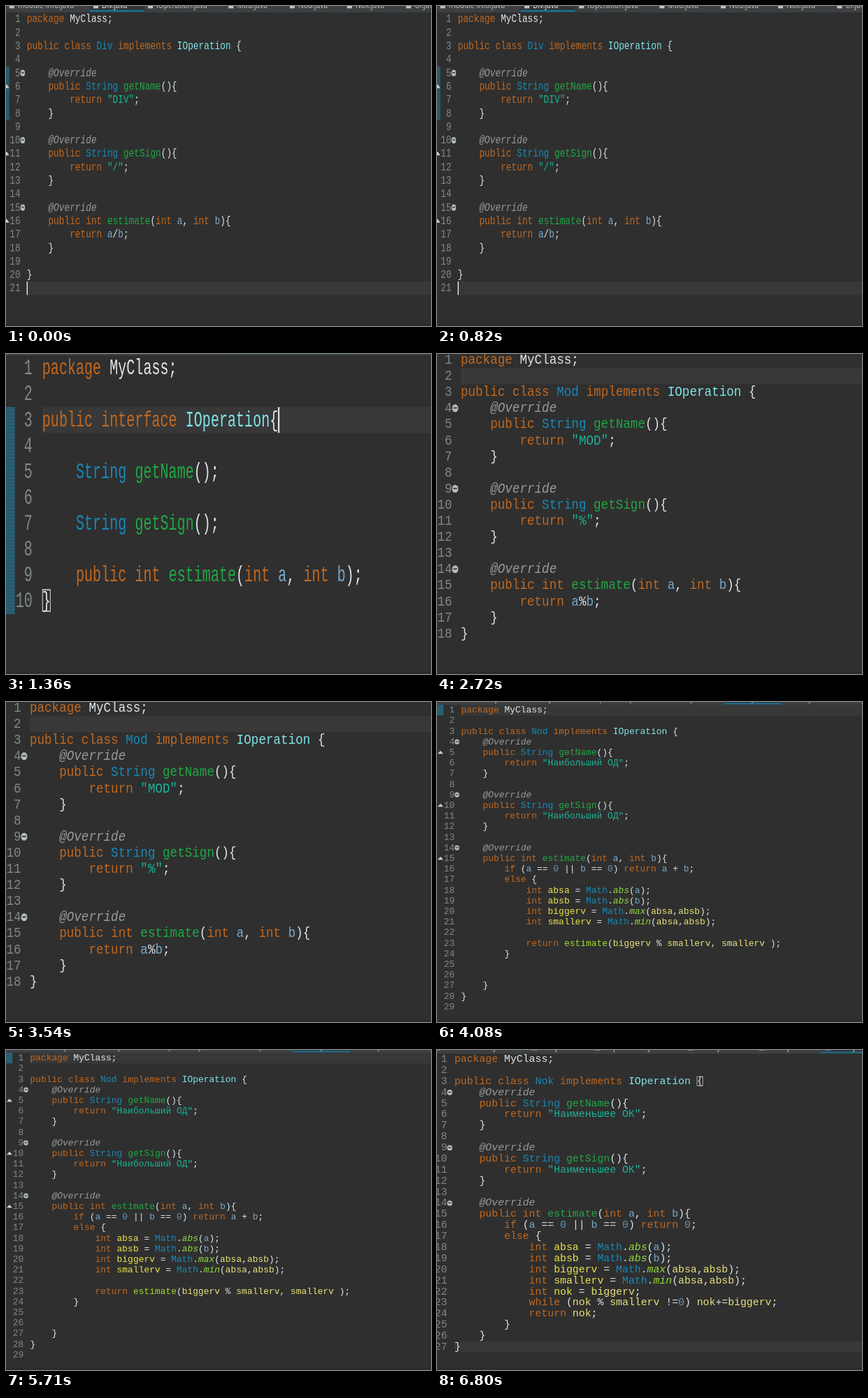
An HTML page for the animation above (8 s loop, 608 by 459 pixels).

```html
<!DOCTYPE html>
<html lang="en">
<head>
<meta charset="utf-8">
<title>Java operations</title>
<style>
html, body { margin: 0; width: 100%; height: 100%; overflow: hidden; background: #2f2f2f; }
#stage { position: relative; width: 608px; height: 459px; overflow: hidden; }
#reel { position: absolute; left: 0; top: 0; animation: cuts 8s step-end infinite; }
@keyframes cuts {
  0% { top: 0; }
  17% { top: -459px; }
  34% { top: -918px; }
  51% { top: -1377px; }
  85% { top: -1836px; }
}
.slide { position: relative; width: 608px; height: 459px; overflow: hidden; background: #2f2f2f; }
.slide::after { content: ""; position: absolute; inset: 456px 0 0; background: #2b2b2b; }

/* Editor space: 12 x 23 per character cell, origin at the first one */
.editor { position: absolute; left: 0; top: 0; width: 0; height: 0; transform-origin: 0 0; }
.editor > * { position: absolute; }
pre { margin: 0; font: 20px/23px "Liberation Mono", monospace; color: #dfe5ea; white-space: pre; top: 0; }
.code { left: 0; }
.numbers { right: 14px; text-align: right; color: #7f888b; }
.row { left: 0; width: 1200px; height: 23px; background: #383838; }
.caret { width: 2px; height: 23px; background: #f4f4f4; }
.brace { width: 10px; height: 18px; border: 1.3px solid #d8d8d8; }
.diff { left: -53px; width: 14px;
  background: repeating-conic-gradient(#23718c 0 25%, #2c4f5c 0 50%) 0 0 / 3px 3px; }
.fold { left: -14.5px; width: 10.5px; height: 10.5px; border-radius: 50%; background: #b4bcbe; }
.fold::after { content: ""; position: absolute; left: 2.5px; top: 4.3px; width: 5.5px; height: 2px; background: #3a3f41; }
.override { left: -52px; width: 13px; height: 7px; background: #cfd3d4; clip-path: polygon(50% 0, 100% 100%, 0 100%); }

.bar { left: -60px; width: 1300px; top: -40px; height: 40px; background: #3c4042; }
.tab { top: -40px; height: 40px; color: #c3c8ca; font: 16px/20px "Open Sans", sans-serif; white-space: pre; }
.tab b { position: absolute; left: 27px; top: 17px; font-weight: 400; }
.tab i { position: absolute; left: 8px; top: 20px; width: 11px; height: 13px; background: #c0c6c8; }
.tab.active { background: #30363a; color: #f0f2f3; }
.tab.active::after { content: ""; position: absolute; inset: 35.8px 0 .6px; background: #1d7191; }

.keyword { color: #c2681f; }
.type { color: #1889b6; }
.iface { color: #80e4e8; }
.decl { color: #1fa843; }
.call { color: #9fdc28; }
.static { color: #92dc3e; font-style: italic; }
.string { color: #19b597; }
.note { color: #999; font-style: italic; }
.param { color: #79a9cc; }
.fresh { color: #ebe34c; }
.local { color: #e8e27a; }
.number { color: #6490b2; }
</style>
</head>
<body>
<div id="stage"><div id="reel"></div></div>
<script>
const CELL = 12, LINE = 23;

const TOKENS = new RegExp([
  '(?<string>"[^"]*")',
  '(?<note>@Override)',
  '(?<keyword>\\b(?:package|public|class|interface|implements|return|int|if|else|while)\\b)',
  '(?<iface>IOperation)',
  '(?<type>\\b(?:String|Math|Div|Mod|Nod|Nok)\\b)',
  '(?<call>(?<=return )estimate)',
  '(?<decl>getName|getSign|estimate)',
  '(?<static>\\b(?:abs|max|min)(?=\\())',
  '(?<fresh>(?<=int )(?:abs[ab]|biggerv|smallerv|nok))',
  '(?<local>\\b(?:abs[ab]|biggerv|smallerv|nok)\\b)',
  '(?<param>\\b[ab]\\b)',
  '(?<number>\\b0\\b)'
].join('|'), 'g');

const highlight = code => code.replace(TOKENS, (text, ...rest) => {
  const groups = rest.at(-1);
  const kind = Object.keys(groups).find(key => groups[key] !== undefined);
  return `<span class="${kind}">${text}</span>`;
});

const method = (head, body) => `    @Override
    public ${head}{
${body.split('\n').map(line => line && '        ' + line).join('\n')}
    }
`;

const operation = (name, label, sign, body, gap = '') => `package MyClass;

public class ${name} implements IOperation {
${gap}${method('String getName()', `return "${label}";`)}
${method('String getSign()', `return "${sign}";`)}
${method('int estimate(int a, int b)', body)}${gap}}`;

const bounds = `    int absa = Math.abs(a);
    int absb = Math.abs(b);
    int biggerv = Math.max(absa,absb);
    int smallerv = Math.min(absa,absb);`;

const TABS = [
  ['module-info', -47], ['Div', 140.6], ['IOperation', 262.5], ['Mod', 443],
  ['Nod', 580], ['Nok', 708], ['Ui', 840], ['', 960]
];

// x, y: origin of the code; w, h: size of one character cell on the stage
const slides = [
  { x: 29.7, y: 9.2, w: 7.68, h: 19.3, tab: 'Div', row: 21, caret: 0, diff: [5, 8],
    code: operation('Div', 'DIV', '/', 'return a/b;', '\n') + '\n' },
  { x: 51.8, y: 1.9, w: 12.05, h: 37.1, tab: 'IOperation', row: 3, caret: 28, diff: [3, 10], brace: [10, 0],
    code: `package MyClass;

public interface IOperation{

    String getName();

    String getSign();

    public int estimate(int a, int b);
}` },
  { x: 33.9, y: -3, w: 10.56, h: 23.1, tab: 'Mod', row: 2,
    code: operation('Mod', 'MOD', '%', 'return a%b;') },
  { x: 34.4, y: 4, w: 7.76, h: 15.2, tab: 'Nod', row: 1, diff: [1, 1],
    code: operation('Nod', 'Наибольший ОД', 'Наибольший ОД', `if (a == 0 || b == 0) return a + b;
else {
${bounds}

    return estimate(biggerv % smallerv, smallerv );
}

`) + '\n' },
  { x: 24.9, y: 5.3, w: 8.89, h: 15.88, tab: 'Nok', row: 27, brace: [3, 39],
    code: operation('Nok', 'Наименьшее ОК', 'Наименьшее ОК', `if (a == 0 || b == 0) return 0;
else {
${bounds}
    int nok = biggerv;
    while (nok % smallerv !=0) nok+=biggerv;
    return nok;
}`) }
];

const box = (kind, style, content = '') => `<div class="${kind}" style="${style}">${content}</div>`;
const lineTop = line => (line - 1) * LINE;

function tabBar(active) {
  return box('bar', '') + TABS.slice(0, -1).map(([name, left], i) =>
    box(name === active ? 'tab active' : 'tab', `left:${left}px;width:${TABS[i + 1][1] - left}px`,
      `<i></i><b>${name}.java</b>`)).join('');
}

function gutter(lines) {
  return lines.map((text, i) => text.includes('@Override')
    ? box('fold', `top:${i * LINE + 6.2}px`) + box('override', `top:${(i + 1) * LINE + 7.5}px`)
    : '').join('');
}

function render({ x, y, w, h, tab, row, caret, diff, brace, code }) {
  const lines = code.split('\n');
  const parts = [
    tabBar(tab),
    box('row', `top:${lineTop(row)}px`),
    diff ? box('diff', `top:${lineTop(diff[0])}px;height:${(diff[1] - diff[0] + 1) * LINE}px`) : '',
    `<pre class="numbers">${lines.map((_, i) => i + 1).join('\n')}</pre>`,
    `<pre class="code">${highlight(code)}</pre>`,
    gutter(lines),
    brace ? box('brace', `left:${brace[1] * CELL}px;top:${lineTop(brace[0]) + 1}px`) : '',
    caret !== undefined ? box('caret', `left:${caret * CELL}px;top:${lineTop(row)}px`) : ''
  ];
  const transform = `translate(${x}px,${y}px) scale(${w / CELL},${h / LINE})`;
  return box('slide', '', box('editor', `transform:${transform}`, parts.join('')));
}

document.getElementById('reel').innerHTML = slides.map(render).join('');
</script>
</body>
</html>
```
